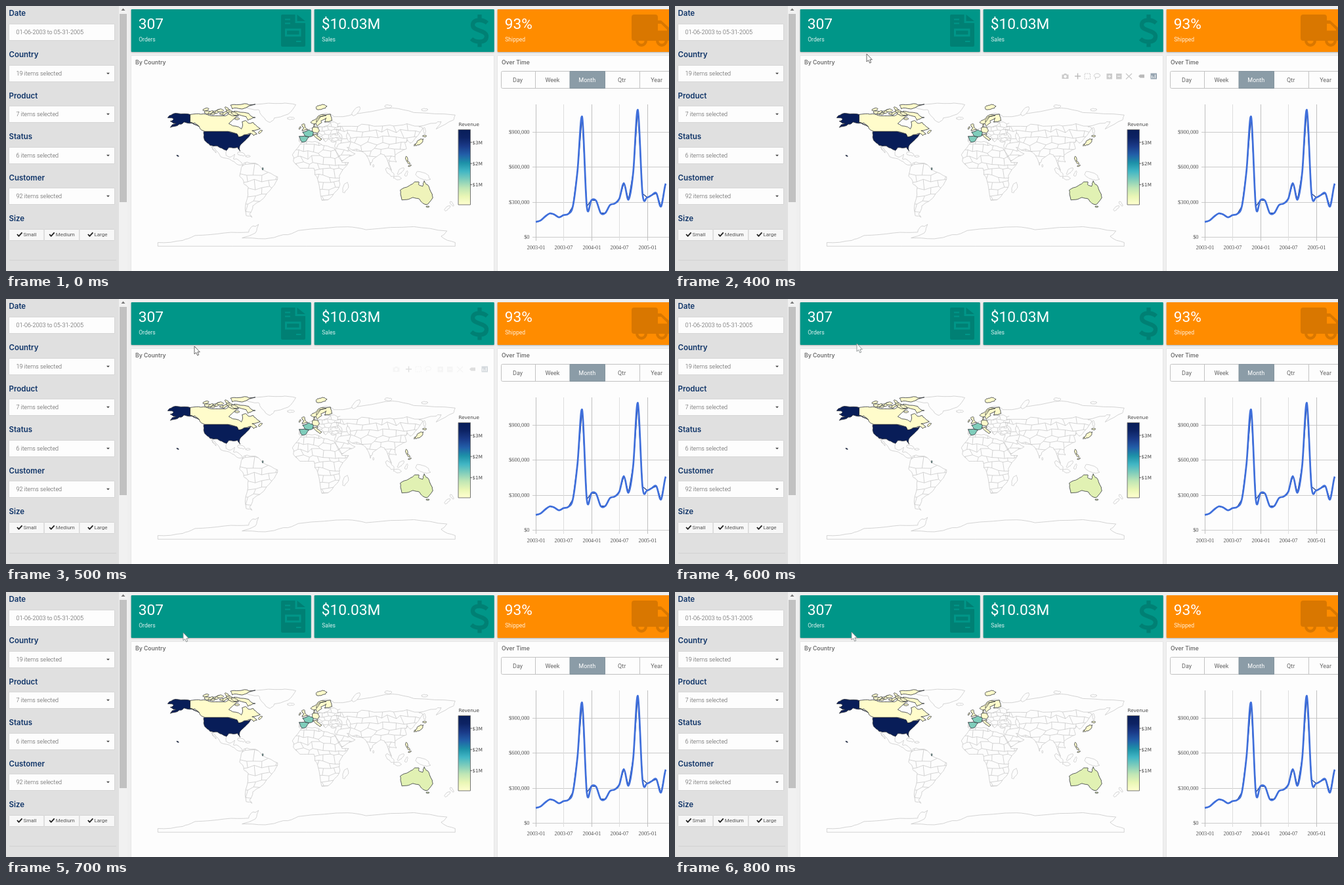
Write an HTML page with a canvas that moves like this. It is 1010 by 404 pixels and loops after 900 ms.

```html
<!DOCTYPE html>
<html lang="en">
<head>
<meta charset="utf-8">
<title>Sales dashboard</title>
<style>
html, body { margin: 0; width: 100%; height: 100%; overflow: hidden; background: #efefef; }
canvas { display: block; width: 1010px; height: 404px; }
</style>
</head>
<body>
<canvas id="stage" width="1010" height="404"></canvas>
<script>
const ctx = document.getElementById('stage').getContext('2d');
const LOOP = 900;
const ROBOTO = 'Roboto, sans-serif', INTER = 'Inter, sans-serif';
const PANEL = '#fdfdfd', NAVY = '#081d58', PALE = '#fffccb', MINT = '#7fcdbb', DARK = '#30343a';

// ---- drawing helpers ----
function box(x, y, w, h, fill, stroke, r = 0) {
  ctx.beginPath();
  ctx.roundRect(x, y, w, h, r);
  if (fill) { ctx.fillStyle = fill; ctx.fill(); }
  if (stroke) { ctx.strokeStyle = stroke; ctx.lineWidth = 1; ctx.stroke(); }
}
function text(str, x, y, font, color, align = 'left') {
  ctx.font = font;
  ctx.fillStyle = color;
  ctx.textAlign = align;
  ctx.fillText(str, x, y);
}
function line(color, width, ...pts) {
  ctx.beginPath();
  for (let i = 0; i < pts.length; i += 2) ctx.lineTo(pts[i], pts[i + 1]);
  ctx.strokeStyle = color;
  ctx.lineWidth = width;
  ctx.stroke();
}
function paint(d, fill, rule) {
  ctx.fillStyle = fill;
  ctx.fill(new Path2D(d), rule);
}

// ---- map building: key points in degrees, roughened into coasts ----
let seed = 7;
function wobble() {
  seed = (seed * 16807) % 2147483647;
  return seed / 2147483647 * 2 - 1;
}
const mapX = lon => 457.8 + 1.258 * lon;
const mapY = lat => 253 - 1.258 * lat;

// Splits every edge at a displaced midpoint; edges along a meridian or parallel stay straight.
function roughen(pts, amp) {
  return pts.flatMap(([x, y], i) => {
    const [u, v] = pts[(i + 1) % pts.length];
    const k = x === u || y === v ? 0 : Math.min(amp, Math.hypot(u - x, v - y) * .16);
    return [[x, y], [(x + u) / 2 + k * wobble(), (y + v) / 2 + k * wobble()]];
  });
}
function outline(pts, amp) {
  const path = new Path2D();
  for (const [lon, lat] of roughen(roughen(pts, amp), amp / 2)) path.lineTo(mapX(lon), mapY(lat));
  path.closePath();
  return path;
}
function coast(keys, amp = 1.3) {
  const n = keys.split(' ').map(Number);
  return outline(Array.from({ length: n.length / 2 }, (_, i) => [n[2 * i], n[2 * i + 1]]), amp);
}
function isle(lon, lat, length, tilt = 0) {
  const c = Math.cos(tilt * Math.PI / 180), s = Math.sin(tilt * Math.PI / 180);
  return outline(Array.from({ length: 7 }, (_, i) => {
    const a = i * Math.PI * 2 / 7, u = length / 2 * Math.cos(a), v = length / 5 * Math.sin(a);
    return [lon + u * c - v * s, lat + u * s + v * c];
  }), 1);
}
// A jittered brick mesh stands for the borders inside a landmass.
function mesh(west, south, east, north, dx, dy) {
  const cols = Math.ceil((east - west) / dx), rows = Math.ceil((north - south) / dy);
  const nodes = Array.from({ length: cols + 1 }, (_, i) => Array.from({ length: rows + 1 }, (_, j) =>
    [mapX(west + dx * (i + .35 * wobble())), mapY(south + dy * (j + .35 * wobble()))]));
  const path = new Path2D();
  const edge = (a, b) => { if (a && b) { path.moveTo(...a); path.lineTo(...b); } };
  for (let i = 0; i <= cols; i++) for (let j = 0; j <= rows; j++) {
    edge(nodes[i][j], nodes[i + 1]?.[j]);
    if ((i + j) % 2 === 0) edge(nodes[i][j], nodes[i][j + 1]);
  }
  return path;
}

const southAmerica = coast('-77.5 8 -72 12 -62 10.7 -50 1 -35 -6 -39 -16 -48 -26 -57 -36 -65 -41 -69 -51 -66 -55 -73 -53 -73.5 -38 -70.5 -18.5 -76 -14 -81 -5');
const africa = coast('-6 35.8 -17 21 -16 13 -8 4.5 9 4.5 13.5 -9 18.5 -34.3 26 -33.8 35 -24 40.5 -14.5 39.5 -5 51 11.5 43 11.5 33 29 20 32 10.5 37');
const eurasia = coast('-9 43 -9 37 -5.6 36 0 39 3 43 14 45 20 40 23 36.5 26 40 30 36.5 36 36.7 34.5 30 43 13 59 22 49 30 57 26 66 25 72.5 20 77.5 8 80 15 90 22 97 17 103 2 100 13 109 12 107 20 121 28 119 35 122 39 126 35 129 37 141 53 136 55 155 59 163 61 157 52 178 63 180 69 130 72 104 77.5 70 72 44 67 33 67 29 70.5 18 69.5 5 60 11 59 24 65 22 60 29 60 20 54.5 8 54 2 51 -4 48.5 -1 45');
const plain = [
  southAmerica, africa, eurasia,
  coast('-117 32.5 -108 31.5 -97 26 -97.5 20 -91 18.5 -87 21.5 -88.5 15.8 -83.3 15 -77.3 8.5 -85 10 -91 14 -104 18.5 -112 29.5 -114.5 31 -109.5 23 -114 27.5'),
  coast('-73 78 -58 75.5 -53 67 -44 60 -39 65.5 -22.5 70 -13 81.5 -30 83 -60 82'),
  coast('-180 -85.5 -150 -83 -135 -77 -100 -74 -70 -73 -66 -66 -58 -63.5 -62 -74 -78 -80 -50 -81 -28 -76 -10 -71 50 -66.5 72 -70 130 -66.3 170 -71.5 163 -78 180 -85.5 180 -90 -180 -90'),
  isle(-19, 65, 9), isle(-79, 21.7, 10, -15), isle(-71, 19, 6), isle(47, -19, 14, 70),
  isle(60, 73.5, 14, 50), isle(99, 79.5, 9), isle(143, 50, 8, 95), isle(143, 75.5, 8),
  isle(81, 7.5, 3.5, 90), isle(101, -.5, 15, -47), isle(114, 1, 11, 45), isle(110, -7.3, 10, -8),
  isle(121, -2, 7, 70), isle(141, -5, 20, -22), isle(176, -38.5, 7, -50), isle(170.5, -44, 9, 40),
  isle(34.5, 43.3, 12), isle(51, 42, 11, 105)
];
const borders = [
  [southAmerica, mesh(-82, -56, -34, 12, 9, 9)],
  [africa, mesh(-18, -35, 52, 37, 6.5, 7.5)],
  [eurasia, mesh(-10, 37, 42, 58, 4, 4.5)],
  [eurasia, mesh(36, 12, 135, 51, 8, 7.5)]
];
const arctic = Array.from({ length: 13 }, (_, i) =>
  isle(-122 + 2.9 * i, 73.5 + 3 * wobble(), 8 + 2.5 * wobble(), 40 * wobble()));
const pale = [
  coast('-141 69.6 -141 60.3 -135 59.5 -130 55 -123 49 -95 49 -84 46 -82.5 42.5 -75 45 -70 46.5 -64 44 -60 46 -66 50 -56 52.5 -64.5 60 -70 59 -74 62.3 -78 61 -79 52 -82 54.5 -94 58.5 -87 65 -82 68.5 -95 70.5 -98 68 -115 68 -128 70'),
  coast('-62 66 -71 62.5 -73 67 -89 71 -88 73.7 -70 71'),
  coast('-90 76.5 -78 76.3 -62 82 -75 82.8 -92 81'),
  ...arctic, isle(-84, 64.5, 6), isle(-56, 48.7, 6, 40),
  coast('5 60 8 58 11.5 59 13 55.5 18.5 60 17.5 62 24 65.5 22 60.5 31 62.5 29 70 18 69.5 11 64', .8),
  coast('12 60 12 63 16 67 24 68.5 17 67', .3),
  isle(9.3, 56.3, 4, 80), isle(18, 78.5, 14, 10),
  coast('-5.5 50 1.5 51.5 -2 55.5 -3 58.6 -6 57 -3 53.5', .8), isle(-8, 53.3, 4, 60),
  coast('7 53.5 14 54 15 49 13 47 7 47.5', .8),
  coast('7 45.5 13.7 46.3 12.3 44 18.4 40 16 38 10 43', .6),
  isle(136.5, 36, 13, 38), isle(143, 43.5, 5), isle(131, 32.7, 3, 60),
  isle(121.3, 16, 6, 100), isle(123.5, 11.5, 5, -45), isle(125, 7.5, 4, 20)
];
const mint = [
  coast('-4.7 48.4 2.5 51 8 48.8 7.5 43.8 3 42.5 -1.5 43.4', .7),
  coast('-9 43.2 3 42.4 -1 37 -5.6 36 -7 38', .6),
  isle(-53, 3.8, 3, 90)
];
const australia = [
  coast('113.5 -22 115.5 -34 124 -33 131 -31.5 138 -35 141 -38 147 -39 153 -31 149 -20.5 145 -15 142.5 -10.8 140.5 -17.5 135.5 -15 136 -12 131 -12 122 -18'),
  isle(146.7, -42, 4)
];
const states = [
  coast('-124.6 48.4 -123 49 -95 49 -84 46 -82.5 42.5 -75 45 -67.5 46.5 -70.5 42 -76 36.5 -81 31 -80.5 25.2 -83.5 29.8 -94 29.6 -97.3 26 -103 29 -108 31.5 -117.1 32.5 -122 37 -124.3 41', .7),
  coast('-141 69.6 -141 60.3 -130 55 -138 59 -148 60.5 -154 58 -165 54 -158 58.7 -165 61.5 -161 64 -168 65.6 -166 68.3 -156.5 71'),
  isle(-156, 19.6, 3, -30)
];

function drawMap(step) {
  ctx.lineJoin = 'round';
  ctx.lineWidth = .7;
  ctx.strokeStyle = '#c2c2c2';
  ctx.fillStyle = PANEL;
  for (const [land, lines] of borders) {
    ctx.save();
    ctx.clip(land);
    ctx.stroke(lines);
    ctx.restore();
  }
  plain.forEach((land, i) => {
    if (i > 2) ctx.fill(land);
    ctx.stroke(land);
  });
  ctx.strokeStyle = DARK;
  ctx.lineWidth = .8;
  const groups = [[pale, PALE], [mint, MINT], [australia, step ? '#e1f1b3' : '#eff3ba'], [states, NAVY]];
  for (const [lands, color] of groups) for (const land of lands) {
    ctx.fillStyle = color;
    ctx.fill(land);
    ctx.stroke(land);
  }
}

function drawLegend() {
  const font = '7.2px "DejaVu Sans", sans-serif';
  text('Revenue', 689.5, 183, font, '#444');
  const scale = ctx.createLinearGradient(0, 303, 0, 188);
  const stops = ['#ffffd0', '#e9f6b5', '#bfe6b5', MINT, '#41b6c4', '#1d91a8', '#225ea8', '#1a3a88', '#0d2364', NAVY];
  stops.forEach((color, i) => scale.addColorStop(i / (stops.length - 1), color));
  box(689, 188.5, 18.5, 114.5, scale, '#777');
  for (let m = 1; m <= 3; m++) {
    const y = 304.5 - 32.2 * m;
    line('#555', 1, 707, y, 710, y);
    text(`$${m}M`, 710.5, y + 3, font, '#444');
  }
}

// ---- sidebar ----
function drawSidebar() {
  box(0, 0, 172, 404, '#e0e0e0');
  box(172, 0, 13, 404, '#f1f1f1');
  box(173, 12, 11, 287, '#c1c1c1');
  paint('M175.5 7 L178.5 3.5 L181.5 7Z', '#777');
  const fields = ['Date', 'Country', 'Product', 'Status', 'Customer', 'Size'];
  const values = ['01-06-2003 to 05-31-2005', '19 items selected', '7 items selected', '6 items selected', '92 items selected'];
  fields.forEach((name, i) => {
    const y = 11 + 62.6 * i;
    text(name, 4.5, y + 4.3, `600 11.5px ${INTER}`, '#0f3468');
    if (!values[i]) return;
    const top = Math.round(y + 16) + .5;
    box(4.5, top, 161, 25, PANEL, '#d6d6d6');
    text(values[i], 15.5, top + 15.5, `300 9px ${ROBOTO}`, '#555');
    if (i) paint(`M153 ${top + 11.2} h5 l-2.5 2.6Z`, '#444');
  });
  ['Small', 'Medium', 'Large'].forEach((name, i) => {
    const x = 4.5 + 53.7 * i, mark = x + [12.5, 8, 13][i];
    box(x, 340.5, 53.5, 17, '#f7f7f7', '#d4d4d4', 1);
    line('#222', 1.8, mark, 348, mark + 2.5, 350.8, mark + 7.5, 345.3);
    text(name, mark + 9.5, 351.3, `8px ${ROBOTO}`, '#555');
  });
  line('#d2d2d2', 1, 5, 387.5, 168, 387.5);
}

// ---- top cards ----
function drawCards() {
  const cards = [['#009688', '307', 'Orders'], ['#009688', '$10.03M', 'Sales'], ['#ff8c00', '93%', 'Shipped']];
  cards.forEach(([color, value, label], i) => {
    const x = 190.7 + 279 * i;
    ctx.save();
    ctx.shadowColor = 'rgba(0,0,0,.3)';
    ctx.shadowBlur = 2;
    ctx.shadowOffsetY = .7;
    box(x, 5, 274, 65, color, null, 1);
    ctx.restore();
    text(value, x + 11, 35, `22.7px ${ROBOTO}`, '#fff');
    text(label, x + 11.5, 54.3, `8.6px ${ROBOTO}`, 'rgba(255,255,255,.85)');
  });
  drawIcons('rgba(0,0,0,.15)');
}

function drawIcons(shade) {
  // invoice
  paint('M421 13 H440.5 V26 H456 V60 Q456 62 454 62 H421 Q419 62 419 60 V15 Q419 13 421 13Z' +
    'M425 19.5 h8 v2 h-8Z M425 25.5 h8 v2 h-8Z M425 34.5 h24.5 v12 h-24.5Z M428 37.5 h18.5 v6 h-18.5Z M442 53 h7.5 v2 h-7.5Z', shade, 'evenodd');
  paint('M443.5 13 L455.8 23 H443.5Z', shade);
  // dollar sign as one stroke, so overlaps keep a single tone
  ctx.strokeStyle = shade;
  ctx.lineWidth = 6.3;
  ctx.stroke(new Path2D('M721.5 13 V21 M721.5 55 V62.5 M733 26 C729 22.5 725 21.5 721 21.5 C714 21.5 711 25 711 29 C711 39 732 36 732 46 C732 52 728 54.5 721 54.5 C716 54.5 712 53 709 50'));
  // truck with open wheels and window
  const truck = new Path2D('M957 13 H989 Q993 13 993 17 V22 H998 L1011 34 V46.5 H1014 V53 H957 Q953 53 953 49 V17 Q953 13 957 13Z M993 27 V37.5 H1007 V36 L998 27Z');
  for (const x of [968, 999]) {
    truck.moveTo(x + 9, 53);
    truck.arc(x, 53, 9, 0, 7);
    truck.moveTo(x + 4.6, 53);
    truck.arc(x, 53, 4.6, 0, -7, true);
  }
  ctx.fillStyle = shade;
  ctx.fill(truck);
}

// ---- revenue over time, in thousands per month ----
const sales = [129, 140, 174, 201, 192, 168, 187, 197, 263, 568, 1029, 261, 316, 311, 205, 206, 273, 286,
  327, 461, 320, 552, 1089, 372, 339, 358, 374, 261, 457];
const monthX = i => 807 + 7.07 * i;
const salesY = v => 352 - v * .1777;

function drawTrend() {
  const serif = '8.4px "Liberation Serif", serif';
  ['$0', '$300,000', '$600,000', '$900,000'].forEach((label, i) => {
    const y = Math.round(salesY(300 * i)) + .5;
    line('#cbcbcb', 1, 802, y, 1010, y);
    text(label, 797.5, y + 2.7, serif, '#555', 'right');
  });
  ['2003-01', '2003-07', '2004-01', '2004-07', '2005-01'].forEach((label, i) => {
    const x = Math.round(monthX(6 * i)) + .5;
    line(i % 2 ? '#dedede' : '#c0c0c0', 1, x, 150, x, 358);
    text(label, x, 370.5, serif, '#555', 'center');
  });
  line('#16357f', 1.2, ...sales.flatMap((v, i) => [monthX(i), salesY(v)]));
  const at = i => sales[Math.max(0, Math.min(sales.length - 1, i))];
  ctx.beginPath();
  ctx.moveTo(monthX(0), salesY(at(0)));
  for (let i = 0; i < sales.length - 1; i++) {
    const a = at(i), b = at(i + 1);
    ctx.bezierCurveTo(monthX(i + 1 / 3), salesY(a + (b - at(i - 1)) / 6),
      monthX(i + 2 / 3), salesY(b - (at(i + 2) - a) / 6), monthX(i + 1), salesY(b));
  }
  ctx.strokeStyle = '#3f6fdb';
  ctx.lineWidth = 2.7;
  ctx.stroke();
}

function drawPanels() {
  box(190.5, 75.5, 553, 335, PANEL, '#e6e6e6');
  box(748.5, 75.5, 270, 335, PANEL, '#e6e6e6');
  text('By Country', 197, 88.6, `600 8.6px ${INTER}`, '#6f6f6f');
  text('Over Time', 755, 88.6, `600 8.6px ${INTER}`, '#6f6f6f');
  box(754.5, 99.5, 270, 26, PANEL, '#c2c2c2', 2);
  box(859, 99.5, 53.5, 26, '#8b9ca7', '#84939d');
  for (const x of [806.5, 965.5]) line('#c2c2c2', 1, x, 100, x, 125);
  ['Day', 'Week', 'Month', 'Qtr', 'Year'].forEach((name, i) =>
    text(name, 779.5 + 52.9 * i, 115.6, `9px ${ROBOTO}`, i === 2 ? '#fff' : '#666', 'center'));
}

// ---- chart toolbar and pointer ----
function drawToolbar(step) {
  if (step !== 1 && step !== 2) return;
  const faint = step === 2;
  const soft = faint ? '#f5f5f5' : '#cbcbcb', firm = faint ? '#dedede' : '#b9b9b9';
  paint('M589.5 104.5 h2.5 l1 -1.5 h3 l1 1.5 h2.5 v6.5 h-10Z M592.3 107.5 a2.2 2.2 0 1 0 4.4 0 a2.2 2.2 0 1 0 -4.4 0Z', soft, 'evenodd');
  line(firm, 1.4, 609, 107, 618, 107);
  line(firm, 1.4, 613.5, 102.5, 613.5, 111.5);
  ctx.setLineDash([2, 1]);
  box(624, 103, 8.5, 8, null, soft);
  ctx.setLineDash([]);
  ctx.stroke(new Path2D('M641 109 C636 107 639 103 643 103 C649 103 649 109 643 109 L640.5 109 V112'));
  for (const x of [657.5, 672]) {
    box(x, 103, 8.5, 8.5, soft);
    line(PANEL, 1, x + 2, 107.2, x + 6.5, 107.2);
  }
  line(PANEL, 1, 661.7, 105, 661.7, 109.5);
  line(soft, 1.3, 687, 103, 696, 111.5);
  line(soft, 1.3, 696, 103, 687, 111.5);
  paint('M706 107 l2.5 -2.5 h6.5 v5 h-6.5Z', firm);
  box(724.5, 102.5, 9.5, 9, faint ? '#d5dade' : '#97a5b1');
  [4, 2.5, 5.5].forEach((h, i) => line(PANEL, 1, 726.5 + 2.5 * i, 110, 726.5 + 2.5 * i, 110 - h));
}

const pointer = [null, [292, 73], [287, 72], [277, 68], [270, 62], [269, 61]];
function drawPointer(step) {
  if (!pointer[step]) return;
  ctx.save();
  ctx.translate(...pointer[step]);
  const arrow = new Path2D('M0 0 V12 L2.7 9.6 L4.7 14 L6.7 13.1 L4.8 8.8 H8.3Z');
  ctx.fillStyle = '#fff';
  ctx.fill(arrow);
  ctx.strokeStyle = step < 3 ? '#555' : '#8a8f90';
  ctx.lineWidth = .9;
  ctx.stroke(arrow);
  ctx.restore();
}

function draw(step) {
  box(0, 0, 1010, 404, '#efefef');
  drawSidebar();
  drawCards();
  drawPanels();
  drawMap(step);
  drawLegend();
  drawTrend();
  drawToolbar(step);
  drawPointer(step);
}

const start = performance.now();
function tick() {
  const t = (performance.now() - start) % LOOP;
  draw(t < 400 ? 0 : Math.floor(t / 100) - 3);
  requestAnimationFrame(tick);
}
tick();
</script>
</body>
</html>
```
